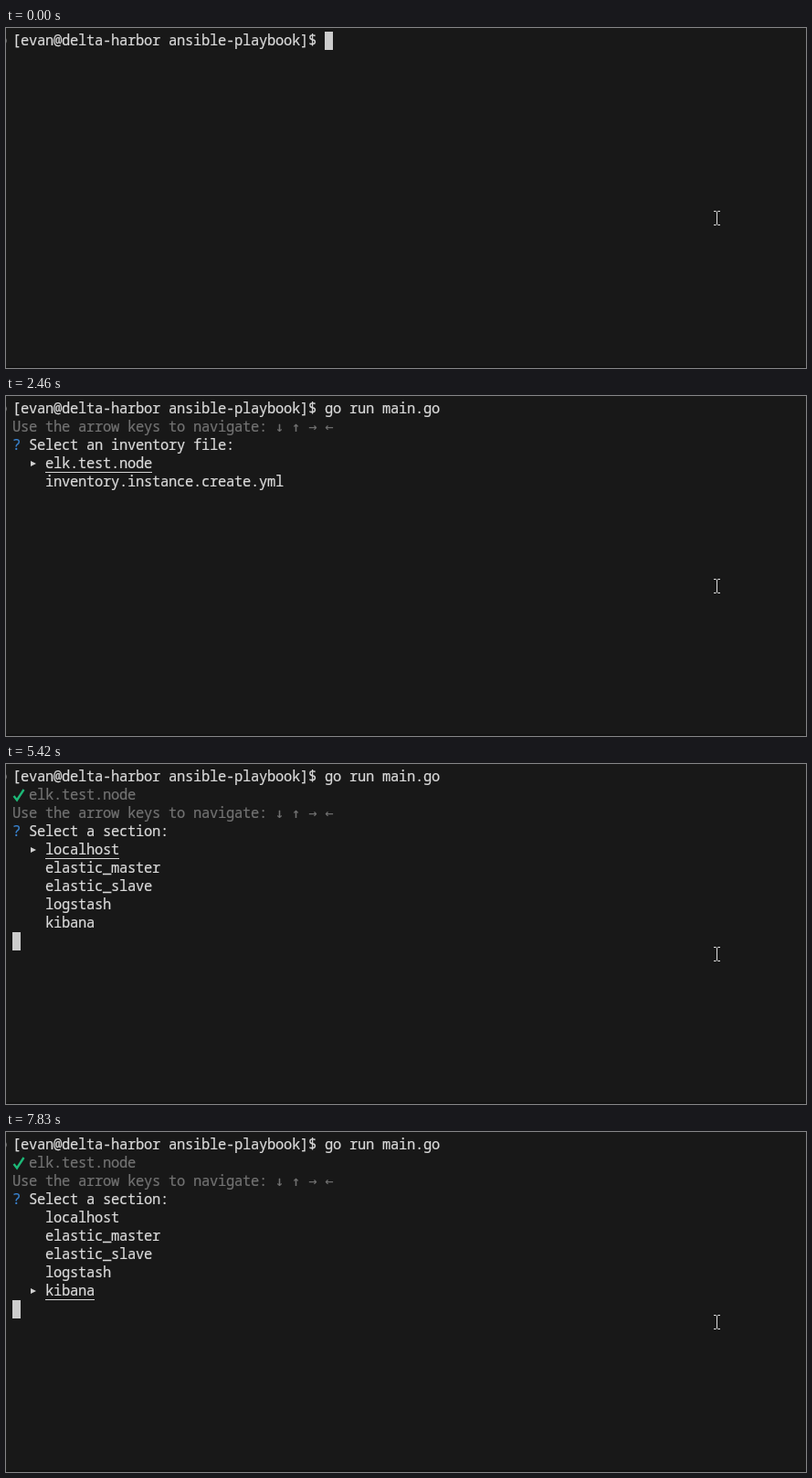
An HTML page that plays this animation: 876 by 372 pixels, repeating every 8000 ms.

```html
<!DOCTYPE html>
<html lang="en">
<head>
<meta charset="utf-8">
<title>Terminal menu</title>
<style>
  html, body { margin: 0; width: 100%; height: 100%; overflow: hidden; background: #181818; }
  #stage { position: relative; width: 876px; height: 372px; overflow: hidden; background: #181818; }
  #stage > *, .row, .row > i { position: absolute; }
  .row {
    left: 7px; height: 20px; white-space: pre; color: #dadada;
    font: 500 15.5px/20px "Noto Sans Mono", "DejaVu Sans Mono", monospace;
    letter-spacing: calc(9px - .6em); font-variant-ligatures: none;
    -webkit-text-stroke: .2px;
  }
  .dim { color: #727272; }
  .arrows { font: 15px/1 "DejaVu Sans Mono", monospace; letter-spacing: 0; }
  .ask { color: #3b86d4; }
  .row > .tri { left: 20px; top: 8px; width: 6px; height: 6px; background: #d0d0d0; clip-path: polygon(0 0, 100% 50%, 0 100%); }
  .row > .line { left: 36px; top: 20px; height: 1px; background: #d4d4d4; }
  #caret { width: 9px; height: 20px; background: #cccccc; }
  #nick { left: 7px; top: 20px; width: 9px; height: 4px; background: #181818; }
  #dot { left: -9px; top: 9px; width: 8px; height: 8px; border: 1px solid #666; border-radius: 50%; }
  #foot { left: 0; top: 370px; width: 876px; height: 2px; background: #121212; }
  svg { left: 0; top: 0; fill: none; }
</style>
</head>
<body>
<div id="stage">
  <div id="dot"></div>
  <div id="text"></div>
  <div id="nick"></div>
  <div id="caret"></div>
  <svg width="876" height="372">
    <path id="check" d="M8.5 35 L12 39.5 L19.5 28" stroke="#1db877" stroke-width="2.4"/>
    <path d="M775 200.5h2.5l1 1 1-1h2.5M778.5 201v14M775 215.5h2.5l1-1 1 1h2.5" stroke="#e0e0e0"/>
  </svg>
  <div id="foot"></div>
</div>
<script>
const LOOP = 8000, CELL = 9, LINE = 20, LEFT = 7, TOP = 4;
const PROMPT = "[evan@delta-harbor ansible-playbook]$ ";
const COMMAND = "go run main.go ";
const FILES = ["elk.test.node", "inventory.instance.create.yml"];
const SECTIONS = ["localhost", "elastic_master", "elastic_slave", "logstash", "kibana"];
const $ = id => document.getElementById(id);

const span = (cls, text) => `<span class="${cls}">${text}</span>`;
const help = span("dim", "Use the arrow keys to navigate: " + span("arrows", "↓ ↑ → ←"));

function menu(title, items, chosen) {
  const rows = items.map((item, i) => "    " + item + (i === chosen
    ? `<i class="tri"></i><i class="line" style="width:${item.length * CELL}px"></i>` : ""));
  return [help, span("ask", "?") + " " + title, ...rows];
}

const typed = n => ({ rows: [PROMPT + COMMAND.slice(0, n)], caret: [PROMPT.length + n, 0] });
const ran = rows => [PROMPT + COMMAND, ...rows];
const pickFile = n => ({ rows: ran(menu("Select an inventory file:", FILES, n)) });
const pickSection = n => ({
  rows: ran([span("dim", "  " + FILES[0]), ...menu("Select a section:", SECTIONS, n)]),
  caret: [0, 9], check: true
});

const steps = [
  [0, typed(0)],
  ...[1, 2, 3, 4, 5].map(n => [105 + n * 105, typed(n)]),
  [1250, typed(6)], [1320, typed(8)], [1380, typed(15)],
  [2170, { rows: ran([]), caret: [0, 1], nick: true }],
  [2460, pickFile(0)], [3580, pickFile(1)], [4290, pickFile(0)],
  [5420, pickSection(0)], [6170, pickSection(1)], [7460, pickSection(2)],
  [7670, pickSection(3)], [7830, pickSection(4)]
];

const show = (id, on) => $(id).style.display = on ? "" : "none";

function draw({ rows, caret, check, nick }) {
  $("text").innerHTML = rows.map((row, i) =>
    `<div class="row" style="top:${TOP - 1 + i * LINE}px">${row}</div>`).join("");
  show("caret", caret);
  show("check", check);
  show("nick", nick);
  if (caret) {
    $("caret").style.left = LEFT + caret[0] * CELL + "px";
    $("caret").style.top = TOP + caret[1] * LINE + "px";
  }
}

let current = -1, start = performance.now();
function tick(now) {
  const t = Math.max(0, now - start) % LOOP;
  const next = steps.filter(([at]) => at <= t).length - 1;
  if (next !== current) draw(steps[current = next][1]);
  requestAnimationFrame(tick);
}
tick(start);
</script>
</body>
</html>
```
